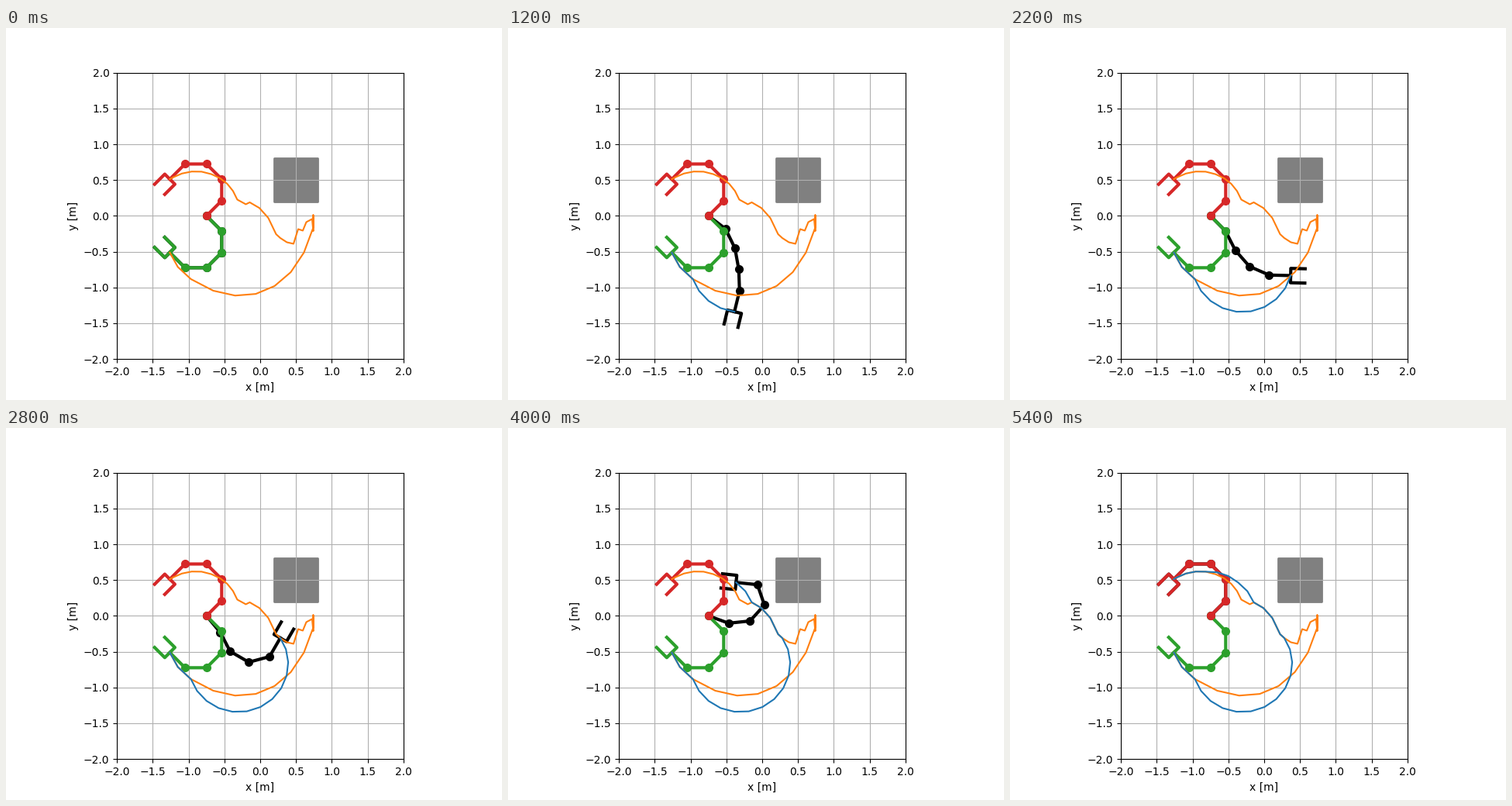
A matplotlib script for the animation above (5.6 s loop, 640x480 px).

```python
from math import comb

import numpy as np
import matplotlib.pyplot as plt
from matplotlib.animation import FuncAnimation
from matplotlib.patches import Rectangle

FRAMES, INTERVAL = 28, 200
BASE = np.array([-0.75, 0.0])
LINK = 0.3
GRIP = 0.1
START, GOAL = [-45] * 5, [45] * 5

# step -> joint angles in degrees; the arm moves straight between them
KEYS = {
    0: START,
    2: [-31, -34, -39.5, -35, -46],
    14: [-50.2, -12.2, 32.3, 45.1, 45],
    15: [-52.9, -7.6, 30.2, 53, 46.3],
    16: [-50.2, 0.9, 32.2, 63.7, 46.8],
    18: [-42, 12.1, 40.2, 68.7, 61.5],
    20: [-20, 26, 42, 61, 65],
    23: [10.2, 41.6, 42.3, 54.6, 56.3],
    26.3: GOAL,
}


def pose(t):
    return [np.interp(t, list(KEYS), joint) for joint in zip(*KEYS.values())]


def joints(angles):
    """Positions of the base, every joint and the hand."""
    a = np.radians(np.cumsum(angles))
    steps = LINK * np.column_stack([np.cos(a), np.sin(a)])
    return np.vstack([BASE, BASE + np.cumsum(steps, axis=0)])


def gripper(hand, angle):
    a = np.radians(angle)
    ahead = 2 * GRIP * np.array([np.cos(a), np.sin(a)])
    side = GRIP * np.array([-np.sin(a), np.cos(a)])
    return np.array([hand + side + ahead, hand + side,
                     hand - side, hand - side + ahead])


def bezier(points, segments):
    n = len(points) - 1
    t = np.linspace(0, 1, segments + 1)[:, None]
    return sum(comb(n, k) * t**k * (1 - t)**(n - k) * np.array(p)
               for k, p in enumerate(points))


def rough_plan(track):
    """Unsmoothed plan: a wide swing, a zigzag, then back along the track."""
    swing = bezier([track[2], (-.235, -1.375), (.505, -1.065),
                    (.741, -.163)], 7)
    zigzag = [(.741, .01), (.741, -.212), (.725, -.044), (.644, -.087),
              (.595, -.206), (.53, -.185), (.465, -.39), (.373, -.369)]
    climb = bezier([(-.32, .227), (-.445, .555), track[23]], 5)
    return np.vstack([track[:2], swing, zigzag, track[14:19],
                      (-.201, .162), climb, track[24:]])


class Arm:
    def __init__(self, ax, color, angles):
        self.links, = ax.plot([], [], "-o", color=color, lw=3, ms=7,
                              markevery=slice(0, 5))
        self.grip, = ax.plot([], [], color=color, lw=3)
        self.move(angles)

    def move(self, angles):
        pts = joints(angles)
        self.links.set_data(*pts.T)
        self.grip.set_data(*gripper(pts[-1], sum(angles)).T)


fig, ax = plt.subplots(figsize=(6.4, 4.8), dpi=100)
ticks = np.arange(-2, 2.1, 0.5)
ax.set(aspect="equal", xlim=(-2, 2), ylim=(-2, 2), xticks=ticks,
       yticks=ticks, xlabel="x [m]", ylabel="y [m]")
ax.grid(True)
ax.add_patch(Rectangle((0.2, 0.2), 0.6, 0.6, color="gray", lw=2,
                       joinstyle="round"))

track = np.array([joints(pose(i))[-1] for i in range(FRAMES)])
arm = Arm(ax, "black", START)
Arm(ax, "tab:green", START)
Arm(ax, "tab:red", GOAL)
ax.plot(*rough_plan(track).T, color="tab:orange")
trail, = ax.plot([], [], color="tab:blue")


def update(i):
    arm.move(pose(i))
    trail.set_data(*track[:i + 1].T)
    return arm.links, arm.grip, trail


anim = FuncAnimation(fig, update, frames=FRAMES, interval=INTERVAL,
                     repeat=True, repeat_delay=0, blit=False)
plt.show()
```
